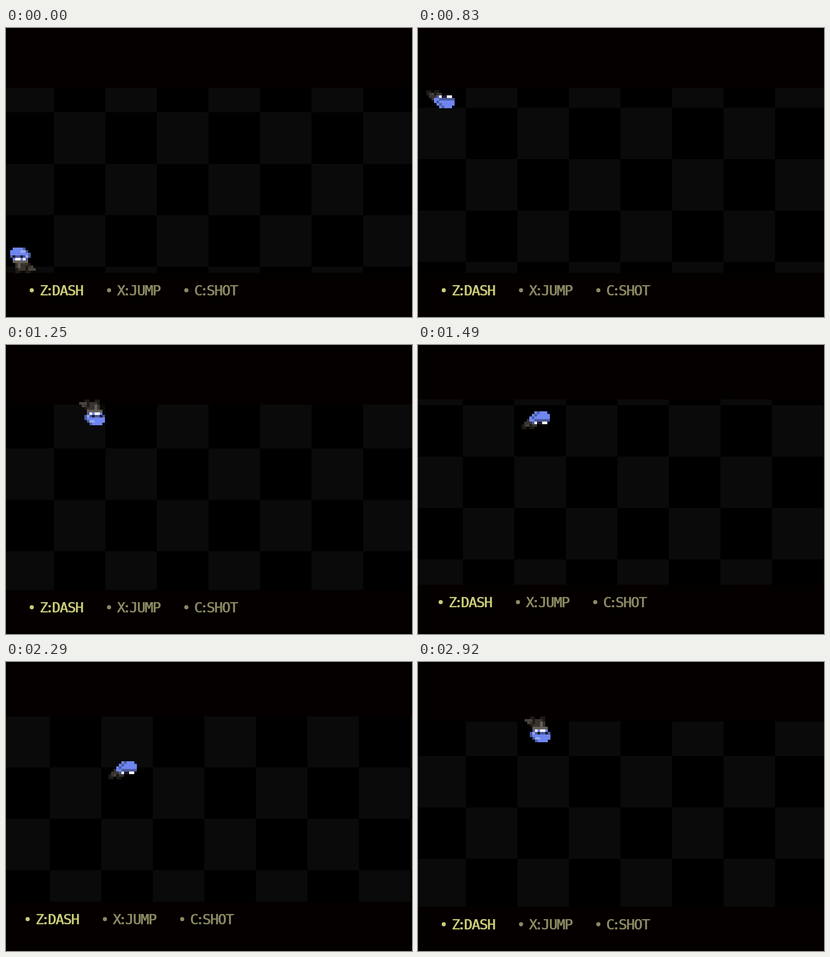
Animation of 788 by 562 pixels, one loop 3.88 s. Source, as an HTML page with a canvas:

```html
<!DOCTYPE html>
<html lang="en">
<head>
<meta charset="utf-8">
<title>Gravity dash</title>
<style>
html, body { margin: 0; width: 100%; height: 100%; overflow: hidden; background: #040000; }
canvas { display: block; }
</style>
</head>
<body>
<canvas id="stage" width="788" height="562"></canvas>
<script>
const ctx = document.getElementById('stage').getContext('2d');
const LOOP = 3880, PX = 5, TILE = 100;
const FIELD = { top: 116, height: 360 };
const FLOOR = 427, CEILING = 106;
const WALK = { from: 803, start: 8, end: 207, speed: 0.3 };

const COLORS = {
  b: '#6f86f0', l: '#95a9ee', d: '#4a5a9c', k: '#1f1c2e', w: '#ffffff',
  g: '#655f58', t: '#48433c', n: '#39332e', s: '#1c1916'
};

// Poses face left and stand upright.
const HEAD = ['.bbbbd....', 'bbbblld...', 'bbbbbbbd..', 'dkddkdld..', '.bwwbwd...', '.gggggg...'];
const POSES = {
  idle: [...HEAD, '..ngnnns..', '..ngnnsnt.', '..snnnsttt', '..ss..ss..'],
  stride: [...HEAD, '.sngnnnn..', '.sngnnnnt.', '.ssnnnsntt', '......ss..'],
  flight: [
    '.bbbdb.....', 'bbbbbdb....', 'bbbbbbdb...', 'ddddddbbn..',
    '.wwkkwdnnn.', '.....nnstns', '......ss.ss'
  ]
};

// Gravity flips: first offset, speed per 30 ms tick, camera kick, time of recovery.
const FLIPS = [
  { at: 650, up: true, first: 84, speed: 237, kick: [-8, -8], rest: 840 },
  { at: 1490, up: false, first: 33, speed: 210, kick: [-6, -10], rest: 1670 },
  { at: 1880, up: true, first: 84, speed: 237, kick: [-10, -10], rest: 2080 },
  { at: 2290, up: false, first: 97, speed: 210, kick: [-8, -10], rest: 2470 },
  { at: 2730, up: true, first: 60, speed: 237, kick: [0, 0], rest: 2920 }
];

function heroAt(t) {
  const walked = Math.max(0, (t - WALK.from) * WALK.speed);
  const x = Math.min(WALK.end, Math.round(WALK.start + walked));
  const hero = { x, y: FLOOR, up: false, right: t >= WALK.from, pose: 'idle', kick: [0, 0] };
  const flip = FLIPS.filter(f => f.at <= t).pop();
  if (flip) {
    const tick = Math.floor((t - flip.at) / 30);
    const moved = Math.min(FLOOR - CEILING, flip.first + tick * flip.speed);
    hero.up = flip.up;
    hero.y = flip.up ? FLOOR - moved : CEILING + moved;
    if (tick === 0) hero.kick = flip.kick;
    if (t < flip.rest) hero.pose = 'flight';
    else if (x < WALK.end && Math.floor((t - WALK.from) / 100) % 2) hero.pose = 'stride';
  }
  return hero;
}

function drawField(t) {
  const { top, height } = FIELD;
  ctx.save();
  ctx.beginPath();
  ctx.rect(-20, top, 840, height);
  ctx.clip();
  ctx.fillStyle = '#000';
  ctx.fillRect(-20, top, 840, height);
  ctx.fillStyle = '#0a0a0a';
  const scroll = (64 + Math.round(t * 0.1094)) % (2 * TILE);
  for (let row = -2; row < 6; row++) {
    for (let col = 0; col < 9; col++) {
      if ((row + col) % 2 === 0) ctx.fillRect(col * TILE - 7, scroll + row * TILE, TILE, TILE);
    }
  }
  ctx.restore();
}

function drawHero({ x, y, up, right, pose }) {
  POSES[pose].forEach((line, row) => {
    [...line].forEach((key, col) => {
      if (key === '.') return;
      const cx = right ? line.length - 1 - col : col;
      const cy = up ? 9 - row : row;
      ctx.fillStyle = COLORS[key];
      ctx.fillRect(x + cx * PX, y + cy * PX, PX, PX);
    });
  });
}

function drawLabel(text, x, color) {
  ctx.fillStyle = color;
  ctx.beginPath();
  ctx.arc(x + 4, 510, 4, 0, 2 * Math.PI);
  ctx.fill();
  let pen = x + 19;
  for (const ch of text) {
    const colon = ch === ':';
    const left = colon ? pen - 4 : pen;
    // Struck twice for heavy stems.
    ctx.fillText(ch, left, 520);
    ctx.fillText(ch, left + 1, 520);
    pen += colon ? 9 : 15;
  }
}

function draw(t) {
  const hero = heroAt(t);
  ctx.setTransform(1, 0, 0, 1, 0, 0);
  ctx.fillStyle = '#040000';
  ctx.fillRect(0, 0, 788, 562);
  ctx.translate(...hero.kick);
  drawField(t);
  drawHero(hero);
  ctx.font = '27px "DejaVu Sans Mono", monospace';
  drawLabel('Z:DASH', 46, '#cbcd78');
  drawLabel('X:JUMP', 196, '#8b8a62');
  drawLabel('C:SHOT', 346, '#8b8a62');
}

const began = performance.now();
function loop() {
  const elapsed = (performance.now() - began) % LOOP;
  draw(Math.floor(elapsed / 10) * 10);
  requestAnimationFrame(loop);
}
loop();
</script>
</body>
</html>
```
